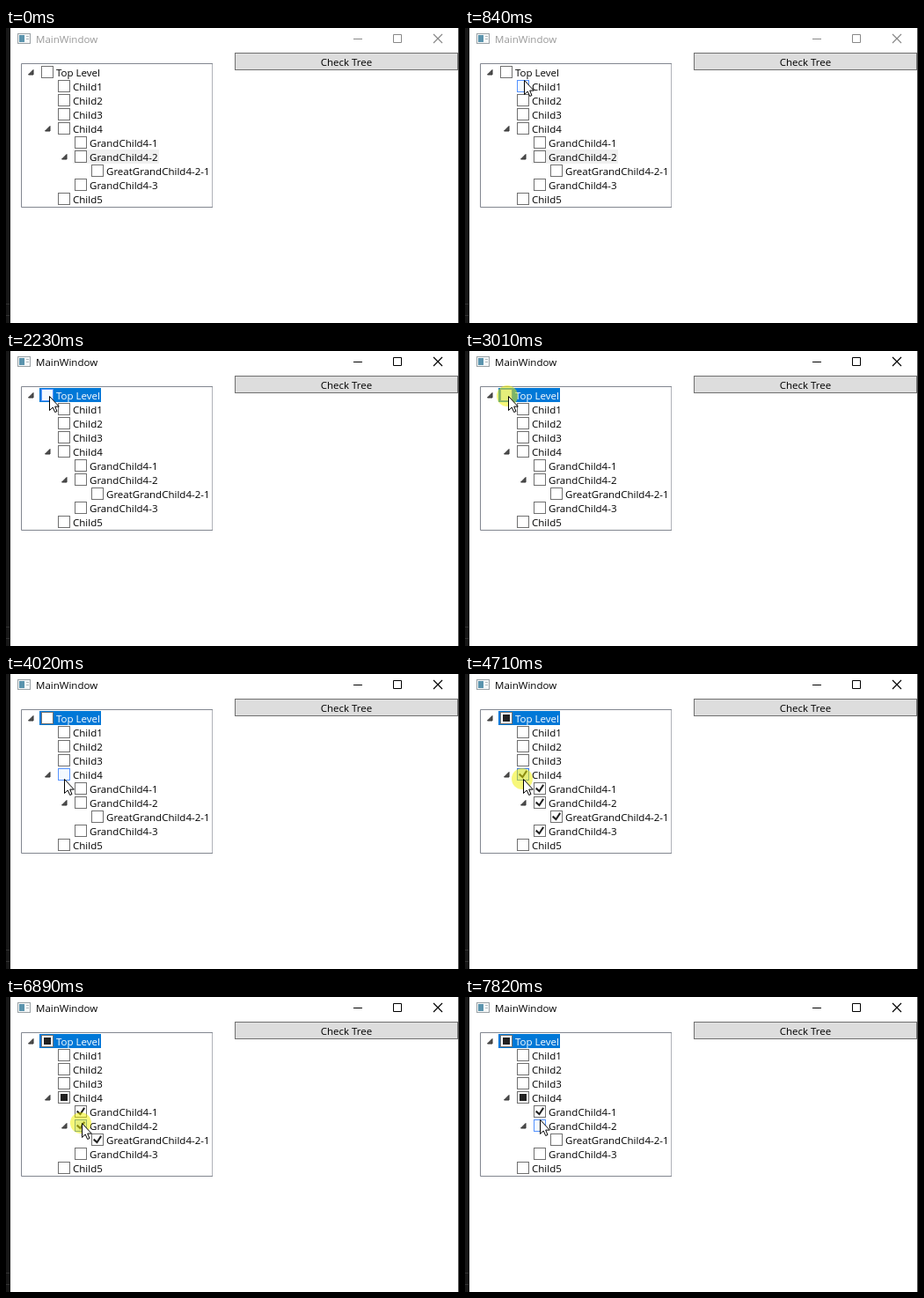
An HTML page that plays this animation: 515 by 335 pixels, repeating every 8000 ms.

```html
<!DOCTYPE html>
<html lang="en">
<head>
<meta charset="utf-8">
<title>Check tree</title>
<style>
  html, body { margin: 0; width: 100%; height: 100%; overflow: hidden; background: #fff; }
  svg { display: block; width: 515px; height: 335px; }
  text { font: 11.53px "Open Sans", "Noto Sans", sans-serif; white-space: pre; }
</style>
</head>
<body>
<svg id="stage" viewBox="0 0 515 335">
  <rect width="5" height="335" fill="#171717"/>
  <path d="M0 313.5h4M0 326.5h4" stroke="#333"/>
  <path d="M514.5 0V335" stroke="#4a4a4a"/>
  <g id="icon">
    <rect x="13.5" y="6.5" width="14" height="11" fill="#f6f8f9" stroke="#9aa2a6"/>
    <rect x="15" y="8" width="6" height="8" fill="#5a93ad"/>
    <path d="M23 9.5h3M23 12.5h3" stroke="#b4bbbf"/>
  </g>
  <text id="title" x="34" y="17">MainWindow</text>
  <g id="controls" fill="none">
    <path d="M395 12.5h10M440.5 7.5h9v9h-9z"/>
    <path d="M486 7l10 10M496 7l-10 10" stroke-width="1.2"/>
  </g>
  <rect x="260.5" y="28.5" width="253" height="19" fill="#ddd" stroke="#707070"/>
  <text x="387" y="43" text-anchor="middle">Check Tree</text>
  <path d="M234.5 41V203" stroke="#b0b3b9"/>
  <path d="M235 40.5H17.5V203.5H235" fill="none" stroke="#828790"/>
  <rect id="selection" height="16"/>
  <g id="tree"></g>
  <circle id="halo" r="12" fill="#f0f000" fill-opacity=".52"/>
  <path id="cursor" d="M.5 .5V16.5L4.2 13L6.7 18.5L9 17.5L6.7 12.1H11.3Z" fill="#fff" stroke="#000"/>
</svg>
<script>
const LOOP = 8000, BOX = 14, ROW = 16, INDENT = 19;
const HOLD = 170;           // how long the mouse button stays down
const APPEARS = 70, ACTIVATES = 920;
const $ = id => document.getElementById(id);

function set(el, attrs) {
  for (const name in attrs) el.setAttribute(name, attrs[name]);
}
function add(parent, tag, attrs) {
  const el = document.createElementNS("http://www.w3.org/2000/svg", tag);
  set(el, attrs);
  return parent.appendChild(el);
}

// Tree, indented by depth
const outline = `Top Level
 Child1
 Child2
 Child3
 Child4
  GrandChild4-1
  GrandChild4-2
   GreatGrandChild4-2-1
  GrandChild4-3
 Child5`;

const nodes = outline.split("\n").map((line, row) => {
  const depth = line.search(/\S/);
  return { label: line.trim(), depth, x: 40 + INDENT * depth, y: 43 + ROW * row, children: [] };
});

nodes.forEach((node, i) => {
  node.parent = nodes.slice(0, i).reverse().find(n => n.depth === node.depth - 1);
  if (node.parent) node.parent.children.push(node);
});

for (const node of nodes) {
  const g = add($("tree"), "g", { transform: `translate(${node.x} ${node.y})` });
  if (node.children.length)
    add(g, "path", { d: "M-9 4.5V10H-14.5Z", fill: "#505050", stroke: "#303030" });
  node.frame = add(g, "rect", { x: .5, y: .5, width: BOX - 1, height: BOX - 1 });
  node.mark = add(g, "path", { fill: "#212121" });
  node.text = add(g, "text", { x: 17, y: 12 });
  node.text.textContent = node.label;
}

const MARKS = {
  true: "M12 3.5L6.7 11.4H6.5L2 7.5L3.3 5.8L6.3 8.4L10.3 2.3Z",
  false: "",
  null: "M3 3h8v8h-8z"
};

// Where the pointer comes to rest, and when it releases a click there
const stops = [];
const rest = (arrive, x, y, ...clicks) => stops.push({ arrive, x, y, clicks });
rest(APPEARS, 277, 115);
rest(150, 267, 109);
rest(840, 66, 59);
rest(960, 59, 51, 1070);
rest(1450, 55, 51);
rest(1850, 52, 51);
rest(1990, 59, 52, 2080);
rest(2230, 48, 51, 2460, 2860, 3160, 3470);
rest(4020, 65, 119, 4400, 4780);
rest(4940, 84, 145);
rest(5260, 84, 129, 5490, 5800);
rest(6020, 86, 135, 6270);
rest(6420, 85, 143, 6570, 7060);
rest(7360, 84, 139, 7520, 7820);

const clicks = stops.flatMap(stop => stop.clicks.map(up => ({ up, node: boxAt(stop) })));

function boxAt({ x, y }) {
  return nodes.find(n => x >= n.x && x < n.x + BOX && y >= n.y && y < n.y + BOX);
}

// Longer moves take longer, by the square root of the distance
function pointerAt(t) {
  const next = stops.findIndex(stop => stop.arrive > t);
  if (next === 0) return stops[0];
  if (next < 0) return stops[stops.length - 1];
  const from = stops[next - 1], to = stops[next];
  const dx = to.x - from.x, dy = to.y - from.y;
  const duration = 38 * Math.sqrt(Math.hypot(dx, dy));
  const k = Math.max(0, 1 - (to.arrive - t) / duration);
  const eased = k * k * (3 - 2 * k);
  return { x: Math.round(from.x + dx * eased), y: Math.round(from.y + dy * eased) };
}

function setDown(node, value) {
  node.checked = value;
  node.children.forEach(child => setDown(child, value));
}

function toggle(node) {
  setDown(node, !node.checked);
  for (let p = node.parent; p; p = p.parent) {
    const first = p.children[0].checked;
    p.checked = p.children.every(c => c.checked === first) ? first : null;
  }
}

function draw(t) {
  const pointer = pointerAt(t), visible = t >= APPEARS;
  const hovered = visible && boxAt(pointer);
  const pressed = clicks.some(({ up }) => t >= up - HOLD && t < up);
  const focused = t >= clicks[0].up;
  const selected = nodes[focused ? 0 : 6];

  setDown(nodes[0], false);
  for (const { up, node } of clicks) if (node && t >= up) toggle(node);

  for (const node of nodes) {
    const over = node === hovered;
    set(node.frame, {
      fill: !over ? "#fff" : pressed ? "#d9ecff" : "#f3f9ff",
      stroke: !over ? "#707070" : pressed ? "#3c77dd" : "#5593ff"
    });
    set(node.mark, { d: MARKS[node.checked] });
    set(node.text, { fill: focused && node === selected ? "#fff" : "#000" });
  }

  set($("selection"), {
    x: selected.x - 2, y: selected.y - 1,
    width: focused ? 70 : 98, fill: focused ? "#0078d7" : "#f0f0f0"
  });
  set($("title"), { fill: t >= ACTIVATES ? "#000" : "#999" });
  set($("controls"), { stroke: t >= ACTIVATES ? "#000" : "#888" });
  set($("halo"), { cx: pointer.x, cy: pointer.y, visibility: pressed ? "visible" : "hidden" });
  set($("cursor"), {
    transform: `translate(${pointer.x + 1} ${pointer.y})`,
    visibility: visible ? "visible" : "hidden"
  });
}

const began = performance.now();
function tick() {
  draw((performance.now() - began) % LOOP);
  requestAnimationFrame(tick);
}
tick();
</script>
</body>
</html>
```
